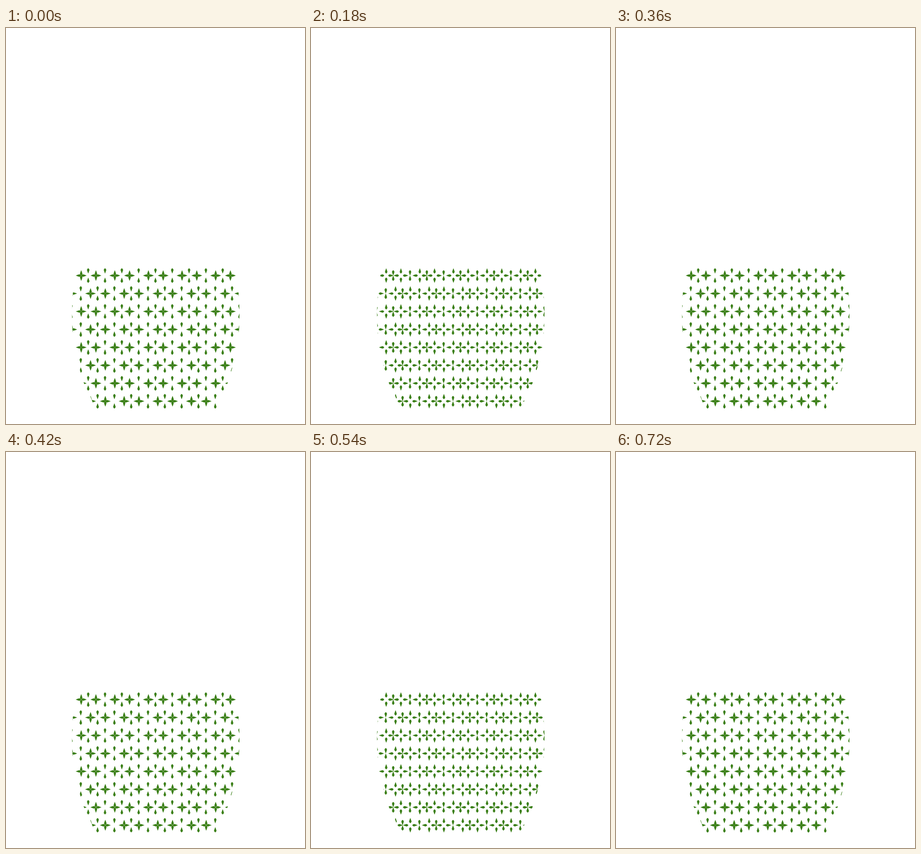
Animation, 651 px wide and 861 px high, one loop 750 ms. Source, as an HTML page with a canvas:

```html
<!DOCTYPE html>
<html lang="en">
<head>
<meta charset="utf-8">
<title>Pulsing petals</title>
<style>
html, body { margin: 0; width: 100%; height: 100%; overflow: hidden; background: #fff; }
canvas { display: block; }
</style>
</head>
<body>
<canvas width="651" height="861"></canvas>
<script>
const ctx = document.querySelector('canvas').getContext('2d');
const LOOP = 750, STEP = 30, HALF = 6;
const LEFT = 163.7, TOP = 538.3, PERIOD = 73.2, PAIR = 32.1, ROW = 39.03, SHIFT = 20.4;
const DROP = 15.3, REACH = 16, LENGTH = 11.8;

// Round end at the origin, sharp tip on the right
const petal = new Path2D(
  `M0 0 Q1.6 -2.6 4 -2.7 Q7 -1.9 ${LENGTH} 0 Q7 1.9 4 2.7 Q1.6 2.6 0 0Z`);

// Half outline of the pot as [distance from the middle, y]
const MIDDLE = 326;
const side = [[171, 522], [175, 538], [180.5, 577], [182.5, 616], [181.5, 655],
  [177.5, 694], [168.5, 733], [156.5, 772], [143.5, 798], [138.5, 811], [132, 828]];
const pot = new Path2D();
for (const [dx, y] of side) pot.lineTo(MIDDLE - dx, y);
for (const [dx, y] of [...side].reverse()) pot.lineTo(MIDDLE + dx, y);
pot.closePath();

function drawPetal(x, y, angle, offset, inward) {
  ctx.save();
  ctx.translate(x, y);
  ctx.rotate(angle);
  ctx.translate(offset, 0);
  if (inward) ctx.scale(-1, 1);
  ctx.fill(petal);
  ctx.restore();
}

function drawStar(x, y, gap) {
  for (let i = 0; i < 4; i++) drawPetal(x, y, i * Math.PI / 2, gap);
}

function drawDrops(x, y, gap) {
  for (const turn of [-1, 1]) drawPetal(x, y, turn * Math.PI / 2, REACH - gap, true);
}

function draw(now) {
  const step = Math.floor(now % LOOP / STEP) % (2 * HALF);
  const phase = 1 - Math.abs(step - HALF) / HALF;
  const gap = (REACH - LENGTH) * phase ** 3;

  ctx.clearRect(0, 0, 651, 861);
  ctx.save();
  ctx.clip(pot);
  ctx.fillStyle = '#3a7f17';
  for (let row = 0; row < 8; row++) {
    const y = TOP + row * ROW;
    for (let col = -1; col < 6; col++) {
      const x = LEFT + col * PERIOD + row % 2 * SHIFT;
      drawStar(x, y, gap);
      drawStar(x + PAIR, y, gap);
      drawDrops(x + DROP, y, gap);
      drawDrops(x + DROP + PERIOD / 2, y, gap);
    }
  }
  ctx.restore();
}

function tick() {
  draw(performance.now());
  requestAnimationFrame(tick);
}
tick();
</script>
</body>
</html>
```
